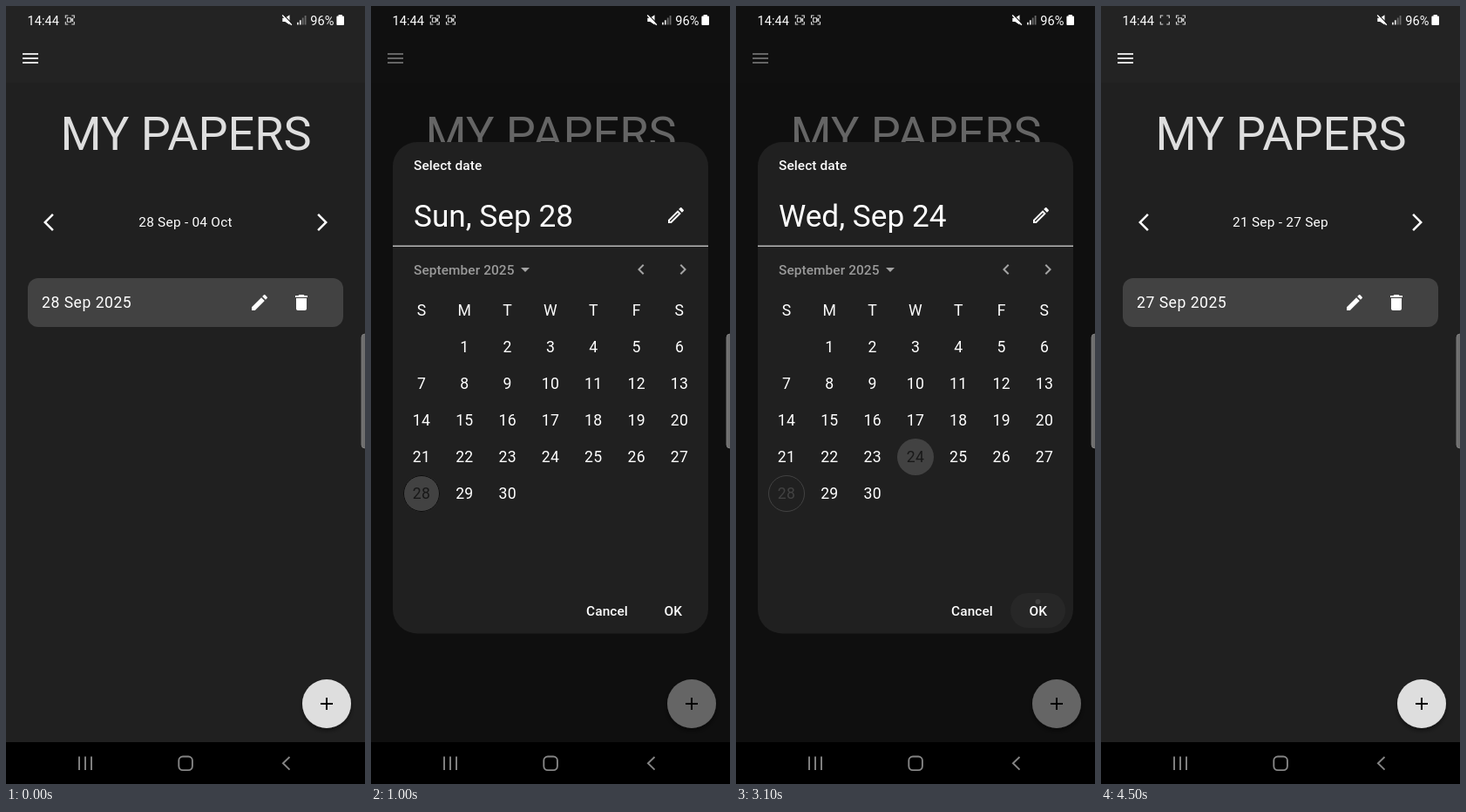
An HTML page for the animation above (5100 ms loop, 412x892 px).

```html
<!DOCTYPE html>
<html lang="en">
<head>
<meta charset="utf-8">
<title>Date picker</title>
<style>
  html, body { margin: 0; width: 100%; height: 100%; overflow: hidden; background: #000; }
  svg { display: block; width: 100vw; height: 100vh; }
  text { font-family: Roboto, sans-serif; fill: #fff; }
  .mid { text-anchor: middle; }
  .label { font-size: 15.4px; font-weight: 500; letter-spacing: .1px; }
  .day { font-size: 17.6px; letter-spacing: .3px; text-anchor: middle; }
  .line { fill: none; stroke-linecap: butt; }
</style>
</head>
<body>
<svg viewBox="0 0 412 892" xmlns="http://www.w3.org/2000/svg">
  <defs>
    <path id="brackets" class="line" stroke="#d8d8d8" stroke-width="1.1"
      d="M.5 3.5v-3h3M7.5 .5h3v3M10.5 7.5v3h-3M3.5 10.5h-3v-3"/>
    <path id="camera" class="line" stroke="#d8d8d8" stroke-width="1.1"
      d="M2.6 3.2h4v4.6h-4zM6.8 5.2l2-1.3v3.2l-2-1.3"/>
    <filter id="shade" x="-30%" y="-30%" width="160%" height="170%">
      <feDropShadow dx="0" dy="3" stdDeviation="2.5" flood-color="#000" flood-opacity=".45"/>
    </filter>
  </defs>

  <!-- app screen -->
  <rect width="412" height="892" fill="#202020"/>
  <rect width="412" height="88" fill="#232323"/>
  <path transform="translate(16 48)" fill="#dedede" d="M3 18h18v-2H3zM3 13h18v-2H3zM3 6v2h18V6z"/>
  <text class="mid" x="206.5" y="164.5" font-size="54" style="fill:#dedede">MY PAPERS</text>
  <g fill="#fff">
    <path transform="translate(37 236)" d="M17.77 3.77L16 2 6 12l10 10 1.77-1.77L9.54 12z"/>
    <path transform="translate(351 236)" d="M6.23 20.23L8 22l10-10L8 2 6.23 3.77 14.46 12z"/>
  </g>
  <text id="week" class="mid" x="206" y="253" font-size="15.4" letter-spacing=".25"></text>
  <rect x="25" y="312" width="362" height="56" rx="12" fill="#424242"/>
  <text id="entry" x="41" y="346" font-size="17.6" letter-spacing=".5"></text>
  <g fill="#fff">
    <path transform="translate(279 328)" d="M3 17.25V21h3.75L17.81 9.94l-3.75-3.75zM20.71 7.04c.39-.39.39-1.02 0-1.41l-2.34-2.34c-.39-.39-1.02-.39-1.41 0l-1.83 1.83 3.75 3.75z"/>
    <path transform="translate(327 328)" d="M6 19c0 1.1.9 2 2 2h8c1.1 0 2-.9 2-2V7H6zM19 4h-3.5l-1-1h-5l-1 1H5v2h14z"/>
  </g>
  <circle cx="368" cy="800" r="28" fill="#dedede" filter="url(#shade)"/>
  <path transform="translate(356 788)" d="M19 13h-6v6h-2v-6H5v-2h6V5h2v6h6z"/>

  <!-- date picker -->
  <g id="picker">
    <rect width="412" height="844" fill="#000" opacity=".54"/>
    <rect x="25" y="156" width="362" height="563.5" rx="28" fill="#202020"/>
    <text class="label" x="49" y="188">Select date</text>
    <text id="chosen" x="49" y="252.5" font-size="35.2"></text>
    <path transform="translate(338 228)" fill="#fff" d="M14.06 9.02l.92.92L5.92 19H5v-.92l9.06-9.06M17.66 3c-.25 0-.51.1-.7.29l-1.83 1.83 3.75 3.75 1.83-1.83c.39-.39.39-1.02 0-1.41l-2.34-2.34c-.2-.2-.45-.29-.71-.29zm-3.6 3.19L3 17.25V21h3.75L17.81 9.94z"/>
    <rect x="25" y="274.6" width="362" height="1.2" fill="#dedede"/>
    <text class="label" x="49" y="307.5" style="fill:#9a9a9a">September 2025</text>
    <g fill="#a4a4a4">
      <path d="M172 300h10l-5 5z"/>
      <path transform="translate(298 290)" d="M15.41 7.41L14 6l-6 6 6 6 1.41-1.41L10.83 12z"/>
      <path transform="translate(346 290)" d="M10 6L8.59 7.41 13.17 12l-4.58 4.59L10 18l6-6z"/>
    </g>
    <circle id="disc" r="21" fill="#424242"/>
    <circle id="today" r="20.5" fill="none"/>
    <g id="days"></g>
    <g id="press">
      <rect x="315" y="673" width="63" height="40" rx="20" fill="#fff" opacity=".03"/>
      <circle cx="346.5" cy="683" r="3" fill="#fff" opacity=".1"/>
    </g>
    <text class="label mid" x="271" y="698.7">Cancel</text>
    <text class="label mid" x="346.7" y="698.7">OK</text>
  </g>

  <!-- system bars -->
  <text x="24.5" y="21.7" font-size="14.6">14:44</text>
  <use href="#brackets" x="67.8" y="10.5"/>
  <use id="blink" href="#camera" x="67.8" y="10.5"/>
  <g id="second">
    <use href="#brackets" x="86" y="10.5"/>
    <use href="#camera" x="86" y="10.5"/>
  </g>
  <path fill="#fff" d="M317.3 13.8h3l5.2-3.6v11.4l-5.2-3.6h-3z"/>
  <path class="line" stroke="#1a1a1a" stroke-width="1.2" d="M318.4 9.8l10.4 11"/>
  <path class="line" stroke="#fff" stroke-width="1.4" d="M317.2 10.4l10.6 11.4"/>
  <path fill="#e0e0e0" d="M334 18.7h1.8v2.8H334zM336.9 16.2h1.8v5.3h-1.8z"/>
  <path fill="#6a6a6a" d="M339.8 13.6h1.8v7.9h-1.8zM342.7 11h1.8v10.5h-1.8z"/>
  <text x="349.3" y="21.7" font-size="14.6">96%</text>
  <path fill="#fff" d="M381.6 10h4.2v1.5h1.2q1 0 1 1v8.5q0 1-1 1h-6.6q-1 0-1-1v-8.5q0-1 1-1h1.2z"/>
  <rect x="408" y="376" width="10" height="131" rx="4" fill="#6f6f6f" stroke="#858585" stroke-width=".8"/>
  <rect y="844" width="412" height="48" fill="#000"/>
  <g class="line" stroke="#858585" stroke-width="1.9">
    <path d="M84 860.5v15.5M91 860.5v15.5M98 860.5v15.5"/>
    <rect x="198.3" y="860.5" width="15.6" height="15.6" rx="4.6"/>
    <path d="M325.5 861l-7.6 7.3 7.6 7.3"/>
  </g>
</svg>
<script>
const LOOP = 5100, OPEN = 700, PICK = 2500, PRESS = 2900, CLOSE = 3200;
const BLINKS = [500, 1000, 1500, 2100, 2600, 3100, 3600, 4100, 4500];
const el = id => document.getElementById(id);
const show = (id, alpha) => el(id).setAttribute("opacity", Number(alpha));
const colX = c => 58 + c * 49.33;
const rowY = r => 349 + r * 42;

function setText(id, value) {
  if (el(id).textContent !== value) el(id).textContent = value;
}

function addCell(label, col, row) {
  const t = document.createElementNS("http://www.w3.org/2000/svg", "text");
  t.setAttribute("class", "day");
  t.setAttribute("x", colX(col));
  t.setAttribute("y", rowY(row) + 6.3);
  t.textContent = label;
  el("days").append(t);
  return t;
}

function place(id, day) {
  el(id).setAttribute("cx", colX(day % 7));
  el(id).setAttribute("cy", rowY(1 + Math.floor(day / 7)));
}

[..."SMTWTFS"].forEach((name, i) => addCell(name, i, 0));
const days = [];
for (let d = 1; d <= 30; d++) days[d] = addCell(d, d % 7, 1 + Math.floor(d / 7));
place("today", 28);

function draw(t) {
  const picked = t >= PICK, saved = t >= CLOSE;
  const day = picked ? 24 : 28;

  setText("week", saved ? "21 Sep - 27 Sep" : "28 Sep - 04 Oct");
  setText("entry", saved ? "27 Sep 2025" : "28 Sep 2025");
  setText("chosen", picked ? "Wed, Sep 24" : "Sun, Sep 28");

  show("picker", t >= OPEN && !saved);
  place("disc", day);
  el("today").setAttribute("stroke", picked ? "#424242" : "#0c0c0c");
  days[28].style.fill = picked ? "#424242" : "#181818";
  days[24].style.fill = picked ? "#181818" : "#fff";
  show("press", t < PRESS ? 0 : Math.min(1, (1 + Math.floor((t - PRESS) / 100)) / 3));

  show("blink", BLINKS.filter(b => t >= b).length % 2 === 0);
  show("second", t < 100 ? 0 : t < 200 ? 0.5 : 1);
}

const start = performance.now();
function tick() {
  draw((performance.now() - start) % LOOP);
  requestAnimationFrame(tick);
}
tick();
</script>
</body>
</html>
```
